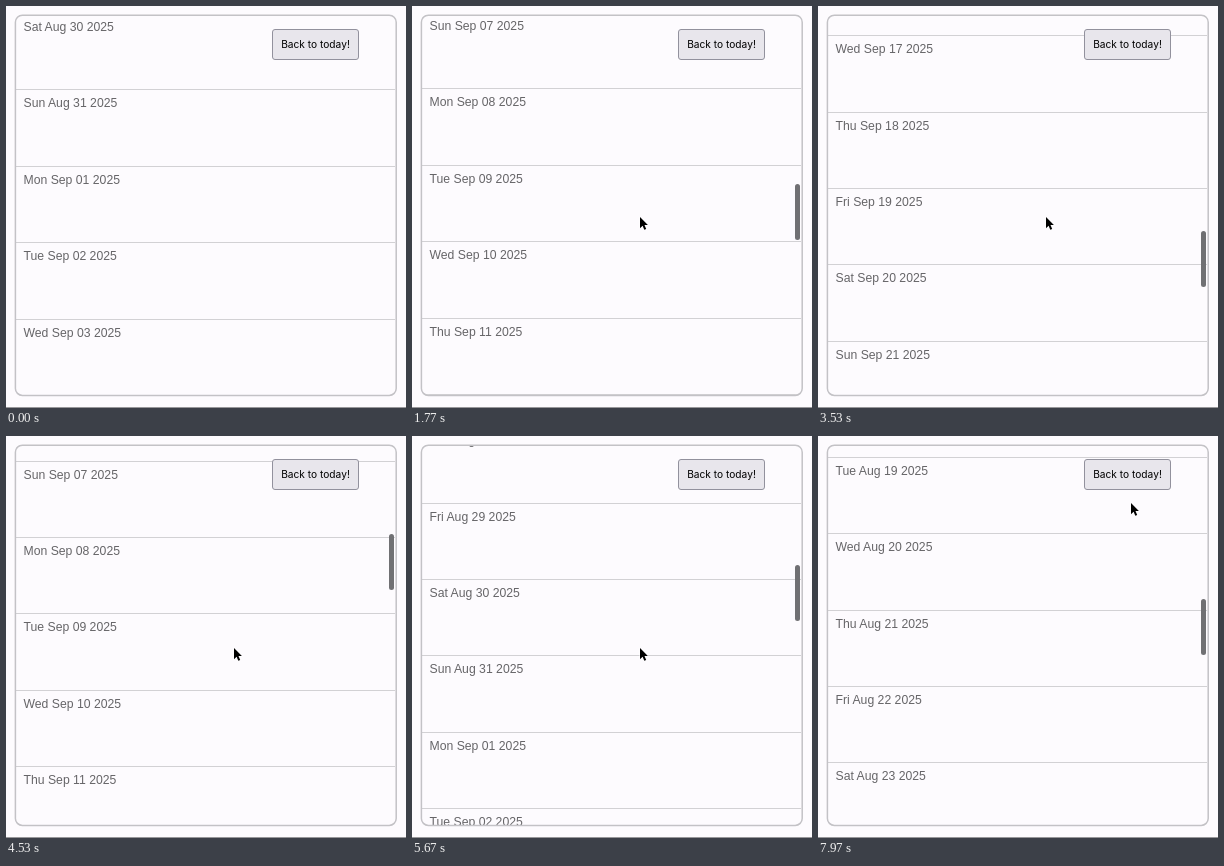
An HTML page that plays this animation: 400x402 px, repeating every 8 s.

```html
<!DOCTYPE html>
<html lang="en">
<head>
<meta charset="utf-8">
<title>Endless day list</title>
<style>
  html, body { margin: 0; width: 100%; height: 100%; overflow: hidden; background: #fdfbfe; }
  #stage { position: relative; width: 400px; height: 402px; overflow: hidden; }
  #stage > * { position: absolute; }
  #list { inset: 0; clip-path: inset(9.5px 10.5px 13px 10px round 7px); }
  .row {
    position: absolute; left: 10px; width: 379px; height: 76px; top: 0;
    box-sizing: border-box; padding: 6px 0 0 7.5px; border-top: 1px solid #d2d1d4;
    font: 12.23px/14px "Liberation Sans", Arial, sans-serif; color: #666568; white-space: pre;
  }
  #frame { left: 0; top: 0; }
  #thumb { left: 382.5px; top: 0; width: 5.5px; height: 56px; border-radius: 3px; background: #707073; }
  button {
    left: 266px; top: 23px; width: 87px; height: 31px; padding: 0; box-sizing: border-box;
    border: 1px solid #92919d; border-radius: 3px; background: #e8e6ec; color: #000;
    font: 10.2px/29px Inter, "Liberation Sans", sans-serif; white-space: nowrap;
  }
  #cursor { left: 0; top: 0; overflow: visible; }
  #edge { left: 0; top: 401px; width: 400px; height: 1px; background: #98979a; }
</style>
</head>
<body>
<div id="stage">
  <div id="list"></div>
  <svg id="frame" width="400" height="402">
    <rect x="9.4" y="9.2" width="380.8" height="380.2" rx="7" fill="none" stroke="#c3c2c6" stroke-width="1.5"/>
  </svg>
  <div id="thumb"></div>
  <button type="button">Back to today!</button>
  <div id="edge"></div>
  <svg id="cursor" width="9" height="14">
    <path d="M0 0V11.2L2.6 8.8L4.3 12.8L6.2 12L4.5 8.1H7.9Z" fill="#000" stroke="#fff" stroke-width=".9" paint-order="stroke"/>
  </svg>
</div>
<script>
  const LOOP = 8000, ROW = 76.4, TOP = 7, TAU = 140;
  const THUMB_TOP = 11, THUMB_RATIO = 0.1466;

  // Flicks: [start ms, distance px]
  const flicks = [[1100, 643], [2300, 711], [3900, -809.5], [5020, -719.4], [6173, -679.4]];

  // The list recentres while scrolling: [from ms, thumb offset px]
  const recentres = [[0, 1037], [1400, 527], [2580, 107], [3900, -1], [5140, 470], [5300, 941], [6330, 1370], [6900, 1891]];

  // Pointer stops: [ms, x, y]
  const stops = [
    [70, 37, 401], [430, 289, 102], [730, 228, 211], [3900, 228, 211],
    [3930, 228, 212], [7540, 228, 212], [7970, 313, 67]
  ];

  const $ = id => document.getElementById(id);
  const list = $("list"), thumb = $("thumb"), cursor = $("cursor");
  const rows = Array.from({ length: 6 }, () => {
    const row = document.createElement("div");
    row.className = "row";
    return list.appendChild(row);
  });

  function scrollAt(t) {
    return flicks.reduce((sum, [start, dist]) => {
      const x = Math.max(0, t - start) / TAU;
      return sum + dist * (1 - (1 + x) * Math.exp(-x));
    }, 0);
  }

  function pointerAt(t) {
    const i = stops.findIndex(s => s[0] > t);
    if (i < 0) return stops[stops.length - 1].slice(1);
    const [t0, x0, y0] = stops[i - 1], [t1, x1, y1] = stops[i];
    const u = (t - t0) / (t1 - t0), k = u * u * (3 - 2 * u);
    return [x0 + (x1 - x0) * k, y0 + (y1 - y0) * k];
  }

  const place = (el, x, y) => { el.style.transform = `translate(${x}px, ${y}px)`; };
  const show = (el, on) => { el.style.visibility = on ? "visible" : "hidden"; };

  function draw(t) {
    const scroll = scrollAt(t), first = Math.floor(scroll / ROW);
    rows.forEach((row, i) => {
      const day = first + i;
      const label = new Date(2025, 7, 30 + day).toDateString();
      if (row.textContent !== label) row.textContent = label;
      place(row, 0, Math.round(TOP + day * ROW - scroll));
    });

    const offset = recentres.filter(r => r[0] <= t).pop()[1];
    place(thumb, 0, THUMB_TOP + THUMB_RATIO * (scroll + offset));
    show(thumb, t >= 1100);

    show(cursor, t >= 70);
    if (t >= 70) place(cursor, ...pointerAt(t));
  }

  function tick() {
    draw(performance.now() % LOOP);
    requestAnimationFrame(tick);
  }
  tick();
</script>
</body>
</html>
```
